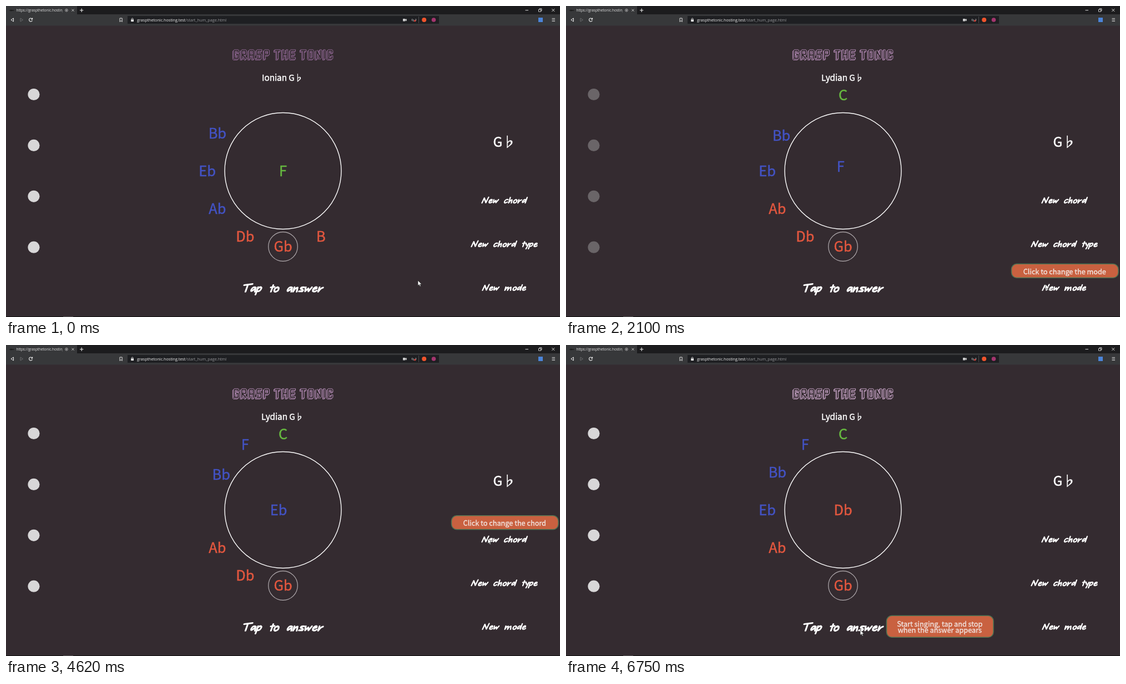
An HTML page with a canvas that plays this animation: 998x561 px, repeating every 6780 ms.

```html
<!DOCTYPE html>
<html lang="en">
<head>
<meta charset="utf-8">
<title>Grasp the Tonic</title>
<style>
html, body { margin: 0; width: 100%; height: 100%; overflow: hidden; background: #342b30; }
canvas { display: block; }
</style>
</head>
<body>
<canvas id="stage" width="998" height="561" aria-label="Grasp the Tonic: Tap to answer, New chord, New chord type, New mode"></canvas>
<script>
const ctx = document.getElementById('stage').getContext('2d');
const LOOP = 6780;
const BG = '#342b30', RED = '#e2573f', BLUE = '#4353c4', GREEN = '#66b840';
const SANS = '"Noto Sans CJK JP", "Noto Sans CJK SC", "Noto Sans", sans-serif';
const UI = '"Open Sans", "Noto Sans", sans-serif';
const MODE_AT = 2000, MOVE_MS = 500;

// Block capitals as single strokes, 7 wide and 14 high
const BLOCK = {
  G: 'M7 3V0H0V14H7V7H4', R: 'M0 14V0H7V7H0L7 14', A: 'M0 14V0H7V14M0 8H7',
  S: 'M7 0H0V7H7V14H0', P: 'M0 14V0H7V7H0', T: 'M0 0H7M3.5 0V14',
  H: 'M0 0V14M7 0V14M0 7H7', E: 'M7 0H0V14H7M0 7H6', O: 'M0 0H7V14H0Z',
  N: 'M0 14V0L7 14V0', I: 'M0 0V14', C: 'M7 3V0H0V14H7V11'
};

// Marker lettering: [advance, stroke]
const arch = 'Q3 -6 5.5 -5.5L6 0';
const bowl = 'M6 -5.5Q2 -7.5 .8 -3Q.5 2 6 -5';
const MARKER = {
  N: [12, 'M.5 0L2 -9L7.5 -.5L9.5 -10.5'],
  T: [11, 'M0 -9L11 -10.5M5 -9.5L4.5 0'],
  a: [8, bowl + 'L6.5 0'],
  c: [8, 'M6 -6Q3 -7.5 1 -4Q0 0 3 0L6 -1.5'],
  d: [9, bowl + 'M7 -10L6.5 0'],
  e: [8, 'M1 -3L5.5 -4.5Q5.5 -7 3 -6Q0 -4 1.5 -.8Q4 .8 6.5 -1.5'],
  h: [9, 'M1 -10L1 0' + arch],
  m: [15, 'M1 -6L1 0' + arch + 'Q8 -6 10.5 -5.5L11.5 0'],
  n: [8.5, 'M1 -6L1 0' + arch],
  o: [8, 'M3.5 -6C-1 -5 0 1 3.5 0C7 -1 7 -6 3 -6'],
  p: [8, 'M1 -6L.5 4M1 -4Q4 -8 6 -5Q6 0 1 -.5'],
  r: [8, 'M1 -6L1 0Q3 -5 6 -5.5'],
  s: [7.5, 'M6 -6Q1 -6.5 2 -4Q7 -2 5 -.5L.5 -.5'],
  t: [6, 'M3 -9L2.5 0M.5 -6L5.5 -6.5'],
  w: [10.5, 'M.5 -6L1.5 -.5L4.5 -4.5L6 -.5L9 -6'],
  y: [7.5, 'M1 -6Q1 -1.5 5 -3L6 -6L3.5 4']
};

// Circle of fifths: hour of each note on the dial
const HOUR = { C: 0, B: 5, Gb: 6, Db: 7, Ab: 8, Eb: 9, Bb: 10, F: 11 };
const IONIAN = { Gb: RED, Db: RED, B: RED, Ab: BLUE, Eb: BLUE, Bb: BLUE, F: GREEN };
const LYDIAN = { Gb: RED, Db: RED, Ab: RED, Eb: BLUE, Bb: BLUE, F: BLUE, C: GREEN };
const SWAPS = [
  { at: 2070, out: 'F', in: 'Bb' },
  { at: 4150, out: 'Bb', in: 'Eb' },
  { at: 5350, out: 'Eb', in: 'Db' }
];
const DIMMED = [[2000, 3120], [4170, 4330], [5350, 5500]];

const POINTER = [
  [0, 742, 495], [130, 742, 495], [580, 864, 502], [2110, 864, 502],
  [2560, 847, 427], [3380, 847, 427], [3780, 826, 358], [4080, 868, 349],
  [5930, 868, 349], [6220, 762, 470], [6540, 530, 514], [LOOP, 530, 514]
];
const GLOW = [
  [0, 166, 118, 172], [1500, 199, 150, 203], [3000, 222, 174, 223],
  [3780, 226, 180, 228], [4620, 212, 164, 215], [5880, 229, 184, 231], [LOOP, 238, 196, 238]
];
const TIPS = [
  { on: 450, off: 2250, x: 802, y: 465, lines: ['Click to change the mode'] },
  { on: 2430, off: 3560, x: 802, y: 365, lines: ['Click to change the type of', 'chord'] },
  { on: 3960, off: 6130, x: 802, y: 307.5, lines: ['Click to change the chord'] },
  { on: 6460, off: 9999, x: 577, y: 488, lines: ['Start singing, tap and stop', 'when the answer appears'] }
];

const clamp = v => Math.max(0, Math.min(1, v));
const smooth = u => u * u * (3 - 2 * u);

function track(keys, t, ease = u => u) {
  let i = 0;
  while (i < keys.length - 2 && keys[i + 1][0] <= t) i++;
  const a = keys[i], b = keys[i + 1];
  const u = ease(clamp((t - a[0]) / (b[0] - a[0])));
  return a.slice(1).map((v, k) => v + (b[k + 1] - v) * u);
}

// heft thickens the regular weight a little
function text(str, x, y, font, color, align = 'center', heft = 0) {
  ctx.font = font;
  ctx.fillStyle = ctx.strokeStyle = color;
  ctx.textAlign = align;
  ctx.fillText(str, x, y);
  if (!heft) return;
  ctx.lineWidth = heft;
  ctx.strokeText(str, x, y);
}

function rect(x, y, w, h, color) {
  ctx.fillStyle = color;
  ctx.fillRect(x, y, w, h);
}

function disc(x, y, r, color) {
  ctx.fillStyle = color;
  ctx.beginPath();
  ctx.arc(x, y, r, 0, 7);
  ctx.fill();
}

function ring(x, y, r, color, width) {
  ctx.strokeStyle = color;
  ctx.lineWidth = width;
  ctx.beginPath();
  ctx.arc(x, y, r, 0, 7);
  ctx.stroke();
}

function line(d, color = '#ddd', width = 1, fill) {
  const p = new Path2D(d);
  ctx.lineWidth = width;
  ctx.strokeStyle = color;
  if (fill) { ctx.fillStyle = fill; ctx.fill(p); }
  ctx.stroke(p);
}

function browser() {
  rect(0, 0, 998, 16, '#1c1c1e');
  rect(0, 0, 128, 16, '#37383a');
  rect(0, 15, 998, 20.5, '#37383a');
  rect(219, 18, 561, 14, '#1e1f22');
  line('M6 8H15M9 6.5V9.5M11 7V9', '#151515');
  ctx.save();
  ctx.beginPath();
  ctx.rect(18, 0, 84, 15);
  ctx.clip();
  text('https://graspthetonic.hosting', 18.5, 10, '6.4px ' + UI, '#e4e4e4', 'left');
  ctx.restore();
  ring(109, 7.7, 2.4, '#bbb', .8);
  disc(109, 7.7, 1, '#ccc');
  line('M118.5 5.7L122.5 9.7M122.5 5.7L118.5 9.7', '#ddd', .9);
  line('M133 7.7H139.4M136.2 4.5V10.9', '#eee', 1.1);
  line('M935.5 7.7H941M983.3 5L988.3 10M988.3 5L983.3 10', '#eee', .9);
  line('M959.5 6.2H963.5V10.2H959.5ZM961 6V4.8H965V8.8H963.8', '#eee', .8);

  line('M13.5 22L9 25L13.5 28Z', '#eee');
  line('M26 22L30.5 25L26 28Z', '#68696b');
  line('M47 23.2A3 3 0 1 0 47.4 26M47.6 21.5V24H45', '#eee', 1.1);
  line('M205 22H209.2V28.5L207.1 26.5L205 28.5Z', '#ddd');
  rect(225.2, 24.3, 4.8, 3.8, '#eee');
  line('M226.2 24.3V22.8Q227.6 20.8 229 22.8V24.3', '#eee', .8);
  const host = 'graspthetonic.hosting.test';
  text(host, 236, 27.6, '7.2px ' + UI, '#f0f0f0', 'left');
  text('/start_hum_page.html', 236 + ctx.measureText(host).width, 27.6, '7.2px ' + UI, '#96979a', 'left');
  rect(715, 23, 4.5, 4.5, '#ccc');
  line('M719 25L721.5 23.5V27Z', '#ccc', .6, '#ccc');
  line('M732 23Q730.5 25 732 27M738 23Q739.5 25 738 27M734 24V28', '#bbb', .9);
  disc(736.7, 26.7, 1.7, '#cf3e36');
  rect(743, 19, .8, 12, '#55565a');
  disc(753.2, 25, 4, '#f0542c');
  disc(770.5, 25, 3.8, '#a4356e');
  rect(959, 21, 8, 8, '#4b84d8');
  line('M983.5 22.5H989M983.5 25H989M983.5 27.5H989', '#ddd', .9);
}

function title(t) {
  const color = `rgb(${track(GLOW, t).map(Math.round)})`;
  const shape = new Path2D();
  let x = 410.5;
  for (const c of 'GRASP THE TONIC') {
    if (c === ' ') { x += 5.7; continue; }
    shape.addPath(new Path2D(BLOCK[c]), new DOMMatrix([1, 0, 0, 1, x, 81]));
    x += c === 'I' ? 7 : 13.7;
  }
  ctx.save();
  ctx.lineJoin = 'bevel';
  ctx.lineCap = 'square';
  const layer = (dx, dy, width, ink) => {
    ctx.save();
    ctx.translate(dx, dy);
    ctx.lineWidth = width;
    ctx.strokeStyle = ink;
    ctx.stroke(shape);
    ctx.restore();
  };
  layer(-.7, .9, 3.8, color);
  layer(-.7, .9, 2.3, BG);
  layer(.8, -.6, 3.8, color);
  layer(.8, -.6, 2.2, BG);
  ctx.restore();
}

function marker(str, x, y, size) {
  ctx.save();
  ctx.translate(x, y);
  ctx.transform(size, 0, -.3 * size, size, 0, 0);
  ctx.lineCap = ctx.lineJoin = 'round';
  for (const c of str) {
    if (c === ' ') { ctx.translate(10, 0); continue; }
    line(MARKER[c][1], '#fff', 2.4);
    ctx.translate(MARKER[c][0], 0);
  }
  ctx.restore();
}

// 1 when a note rests on the dial, 0 when it sits in the centre
function spread(note, t) {
  let s = note === 'F' ? 0 : 1;
  for (const m of SWAPS) {
    if (t < m.at) break;
    const u = clamp((t - m.at) / MOVE_MS);
    if (note === m.out) s = u;
    if (note === m.in) s = 1 - u;
  }
  return s;
}

function dial(t) {
  ring(499, 297.5, 105, '#fff', 1.4);
  ring(499, 434, 26.3, '#b3adb0', 1.2);
  const notes = t < MODE_AT ? IONIAN : LYDIAN;
  for (const n in notes) {
    const a = HOUR[n] * Math.PI / 6, r = 136.5 * spread(n, t);
    text(n, 499 + r * Math.sin(a), 306.8 - r * Math.cos(a), '25.3px ' + SANS, notes[n], 'center', .5);
  }
}

function tip(o, t) {
  const alpha = Math.min(clamp((t - o.on) / 120), clamp((o.off - t) / 120));
  if (!alpha) return;
  const two = o.lines.length > 1;
  ctx.save();
  ctx.globalAlpha = alpha;
  ctx.beginPath();
  ctx.roundRect(o.x + .5, o.y + .3, 192.5, two ? 39 : 25, 9.5);
  ctx.fillStyle = '#c96140';
  ctx.fill();
  ctx.lineWidth = 1.6;
  ctx.strokeStyle = '#4f7352';
  ctx.stroke();
  o.lines.forEach((s, i) => text(s, o.x + 96.3, o.y + (two ? 20 : 18.5) + i * 10.6,
    '12.7px ' + SANS, '#f1e4e0', 'center', .35));
  ctx.restore();
}

function pointer(t) {
  const [x, y] = track(POINTER, t, smooth);
  ctx.save();
  ctx.translate(x, y);
  line('M0 0V9.5L2.2 7.5L3.8 11L5.4 10.3L3.8 7H6.8Z', '#222', .7, '#fff');
  ctx.restore();
}

function draw(t) {
  rect(0, 0, 998, 561, BG);
  browser();
  rect(0, 560, 998, 1, '#111');
  rect(103, 560, 18, 1, '#555');
  title(t);
  const mode = t < MODE_AT ? 'Ionian' : 'Lydian';
  text(mode + ' G♭', 498, 135, '15.2px ' + SANS, '#fff', 'center', .5);
  const dim = DIMMED.some(([a, b]) => t >= a && t < b);
  for (let i = 0; i < 4; i++) disc(50, 159.5 + i * 91.9, 10.6, dim ? '#6a6568' : '#d8d7d8');
  dial(t);
  text('G♭', 898, 253.8, '24.2px ' + SANS, '#fff', 'center', .6);
  marker('Tap to answer', 425.5, 515.3, 1.31);
  marker('New chord', 857, 355.2, .98);
  marker('New chord type', 838, 434, .98);
  marker('New mode', 858, 512.8, .98);
  TIPS.forEach(o => tip(o, t));
  pointer(t);
}

const start = performance.now();
function frame() {
  draw((performance.now() - start) % LOOP);
  requestAnimationFrame(frame);
}
frame();
</script>
</body>
</html>
```
